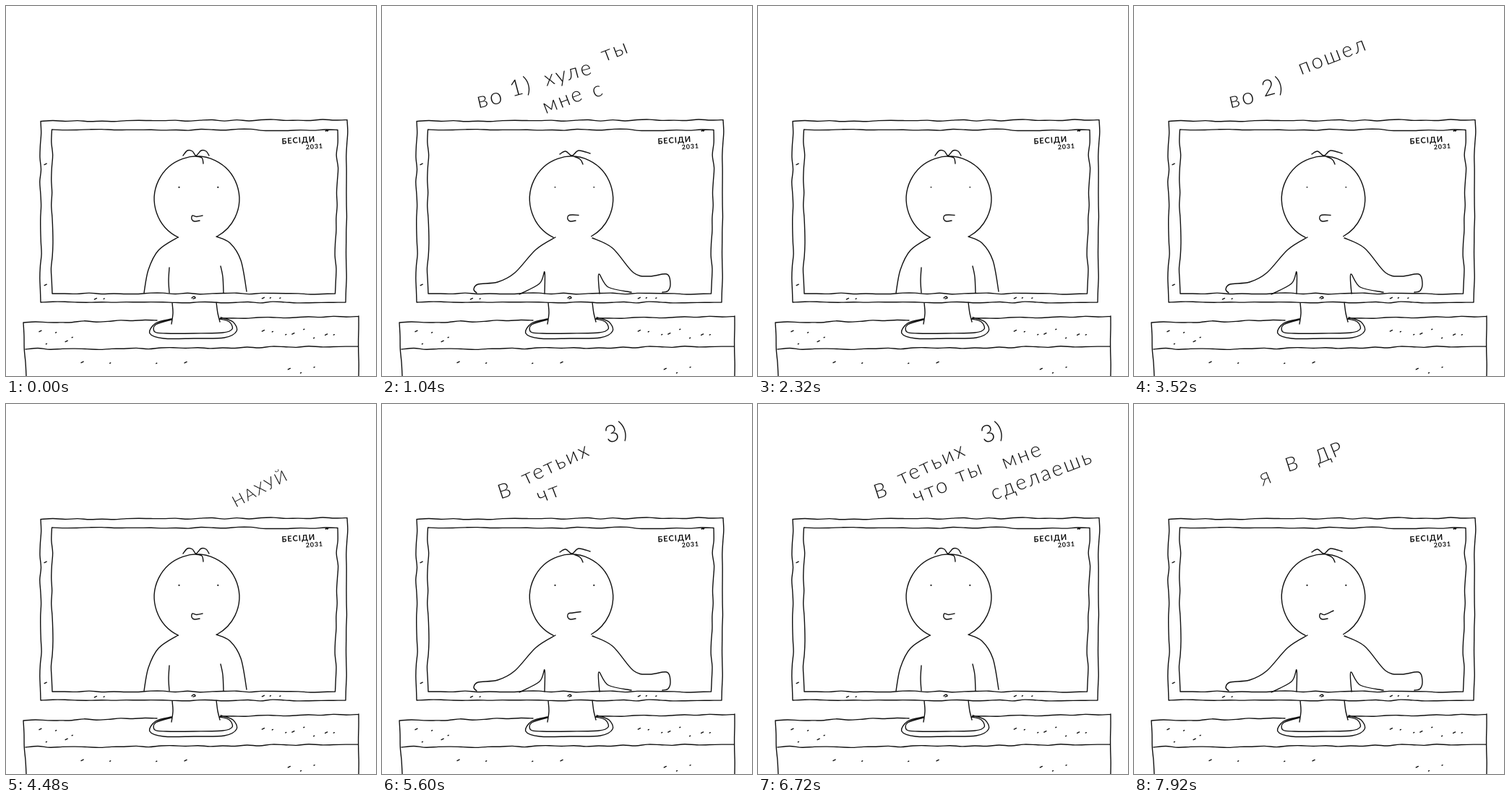
An HTML page with a canvas for the animation above (8 s loop, 512 px wide and 512 px high).

```html
<!DOCTYPE html>
<html lang="uk">
<head>
<meta charset="utf-8">
<style>
html, body { margin: 0; width: 100%; height: 100%; overflow: hidden; background: #fff; }
canvas { display: block; width: 100vw; height: 100vh; }
</style>
</head>
<body>
<canvas id="stage"></canvas>
<script>
const STEP = 80, COUNT = 100, INK = '#111';
const canvas = document.getElementById('stage');
const ctx = canvas.getContext('2d');

function seeded(seed) {
  return () => (seed = (seed * 16807) % 2147483647) / 2147483647;
}
const rand = seeded(2749);

// Smooth curve through all points
function trace(path, p) {
  path.moveTo(...p[0]);
  for (let i = 0; i < p.length - 1; i++) {
    const a = p[i - 1] || p[i], b = p[i], c = p[i + 1], d = p[i + 2] || c;
    path.bezierCurveTo(
      b[0] + (c[0] - a[0]) / 6, b[1] + (c[1] - a[1]) / 6,
      c[0] - (d[0] - b[0]) / 6, c[1] - (d[1] - b[1]) / 6, ...c);
  }
}
function curve(path, s) {
  trace(path, s.split(' ').map(q => q.split(',').map(Number)));
}

// Hand-ruled line with a seeded tremble
function edge(path, [x1, y1], [x2, y2], shake) {
  const len = Math.hypot(x2 - x1, y2 - y1), n = Math.max(2, Math.round(len / 17));
  const p = [];
  for (let i = 0; i <= n; i++) {
    const t = i / n, off = i % n ? (rand() * 2 - 1) * shake : 0;
    p.push([x1 + (x2 - x1) * t - off * (y2 - y1) / len, y1 + (y2 - y1) * t + off * (x2 - x1) / len]);
  }
  trace(path, p);
}
function frameBox(path, corners, shake) {
  corners.forEach((c, i) => edge(path, c, corners[(i + 1) % 4], i % 2 ? shake * 1.4 : shake));
}

// Pen specks scattered from one corner of a strip to the other
function specks(path, x1, y1, x2, y2, n) {
  for (let i = 0; i < n; i++) {
    const x = x1 + (x2 - x1) * (i + 0.2 + rand() * 0.6) / n;
    const y = y1 + (y2 - y1) * rand(), d = i % 3 ? 1 : 3;
    path.moveTo(x, y);
    path.lineTo(x + d, y - d / 2);
  }
}

function makeRoom() {
  const p = new Path2D();
  frameBox(p, [[48, 159.5], [472, 157.5], [470, 410], [48, 410]], 0.9);
  frameBox(p, [[63.5, 171], [459, 171.5], [455.5, 398], [64, 398]], 1.1);
  edge(p, [24, 438], [209, 435], 1);
  edge(p, [297, 432], [488, 429.5], 1);
  edge(p, [27, 475], [487, 471], 1.4);
  edge(p, [24, 438], [28, 512], 1);
  edge(p, [488, 429], [488, 512], 0.6);
  curve(p, '230,411 231,425 229,440');
  curve(p, '291,410 293,425 296,437');
  curve(p, '229,434 207,441 206,451 222,453 260,453 300,452 313,447 309,437 296,433');
  curve(p, '229,433 207,439 199,453 218,460 260,460 302,459 319,450 314,437 297,431');
  curve(p, '257,404 260,402 262,404 259,405');
  specks(p, 41, 468, 98, 444, 5);
  specks(p, 350, 445, 463, 460, 8);
  specks(p, 90, 493, 260, 496, 4);
  specks(p, 380, 508, 432, 492, 3);
  specks(p, 120, 405, 138, 406, 2);
  specks(p, 345, 405, 386, 404, 3);
  specks(p, 52, 220, 55, 218, 1);
  specks(p, 52, 388, 55, 386, 1);
  specks(p, 441, 173, 446, 173, 2);
  return p;
}

const down = ['238,320 211,338 197,365 191,397', '291,319 310,328 325,352 333,395',
  '226,362 225,380 226,397', '297,360 300,375 301,397',
  '245,207 251,200 258,201 263,207 270,200 277,201 281,207', '262,208 271,210 273,218'];
const out = ['240,320 213,337 184,369 160,382 133,385 127,392 131,397',
  '291,321 319,335 348,369 370,374 394,371 399,383 396,394 388,396',
  '225,398 225,368 218,384 190,399', '301,398 300,371 313,389 345,396',
  '246,205 254,201 263,207 272,200 288,204', '262,207 274,212 278,219'];

function makeBody(lines, cx, rx) {
  const p = new Path2D();
  p.ellipse(cx, 267, rx, 59, 0, 2.02, 1.07 + 2 * Math.PI);
  lines.forEach(s => curve(p, s));
  return p;
}
const room = makeRoom();
const bodies = [makeBody(down, 264, 58.8), makeBody(out, 262, 57.6)];

// The lip end moves: smile, flat, wide
function face(beat, open) {
  const p = new Path2D();
  const tip = [[272 + 4 * open, 290 - 4 * open], [272, 289.5], [275, 287.5]][beat];
  trace(p, [tip, [264, beat ? 289 : 291.5], [258, 290], [257, 295], [261, 298], [268, 297]]);
  ctx.stroke(p);
  ctx.beginPath();
  for (const x of [239.5, 293.3]) ctx.ellipse(x, 250.8, 1.1, beat === 1 ? 0.7 : 1.1, 0, 0, 7);
  ctx.fill();
}

// Centre of the first letter, slope in degrees
const word = (text, x, y, slope = -21, size = 29) => ({ text, x, y, slope, size });
const phrases = [
  { from: 0, words: [
    word('во', 139, 132, -13, 31), word('1)', 184, 113, -15, 31), word('хуле', 232, 102, -15),
    word('ты', 311, 68), word('мне', 230, 140), word('сделаешь', 298, 118)] },
  { from: 29, words: [word('во', 139, 132, -13, 31), word('2)', 184, 113, -15, 31), word('пошел', 235, 86)] },
  { from: 47, words: [word('НАХУЙ', 319, 134, -28, 22)] },
  { from: 60, words: [
    word('В', 167, 120, -18, 28), word('тетьих', 201, 103, -25), word('3)', 316, 41, -18, 33),
    word('что', 222, 128), word('ты', 281, 100), word('мне', 345, 81), word('сделаешь', 330, 124)] },
  { from: 95, words: [word('Я', 180, 104, -22, 23), word('В', 216, 83, -18, 27), word('ДР', 257, 72, -22, 27)] }
];
const caption = [word('БЕСІДИ', 384, 187, -4, 11), word('2031', 417, 195, -4, 9)];

function write(w, shown, weight) {
  const small = w.text !== w.text.toUpperCase();
  ctx.save();
  ctx.translate(w.x, w.y);
  ctx.rotate(w.slope * Math.PI / 180);
  ctx.font = `${weight} ${w.size}px Lato, "Open Sans", sans-serif`;
  ctx.letterSpacing = w.size * 0.09 + 'px';
  ctx.fillText(w.text.slice(0, shown), -w.size * 0.24, w.size * (small || /[а-я]/.test(w.text) ? 0.26 : 0.36));
  ctx.restore();
}

// One letter per step; a number and its bracket land together
function type(frame) {
  const { from, words } = phrases.findLast(p => frame >= p.from);
  let left = frame - from;
  for (const w of words) {
    if (left <= 0) break;
    const pair = w.text.endsWith(')');
    write(w, pair ? 2 : left, 300);
    left -= pair ? 1 : w.text.length;
  }
}

function draw(frame) {
  const k = Math.min(canvas.width, canvas.height) / 512;
  ctx.setTransform(k, 0, 0, k, 0, 0);
  ctx.fillStyle = '#fff';
  ctx.fillRect(0, 0, 512, 512);
  ctx.fillStyle = ctx.strokeStyle = INK;
  ctx.lineCap = ctx.lineJoin = 'round';
  ctx.lineWidth = 1.4;
  ctx.stroke(room);
  caption.forEach(w => write(w, w.text.length, 700));

  const phase = frame % 28;
  const open = phase >= 7 && phase < 21 ? 1 : 0;
  ctx.stroke(bodies[open]);
  face(phase % 3, open);
  type(frame);
}

function resize() {
  const r = window.devicePixelRatio || 1;
  canvas.width = innerWidth * r;
  canvas.height = innerHeight * r;
}
addEventListener('resize', resize);
resize();

const start = performance.now();
function tick() {
  draw(Math.floor((performance.now() - start) / STEP) % COUNT);
  requestAnimationFrame(tick);
}
tick();
</script>
</body>
</html>
```
